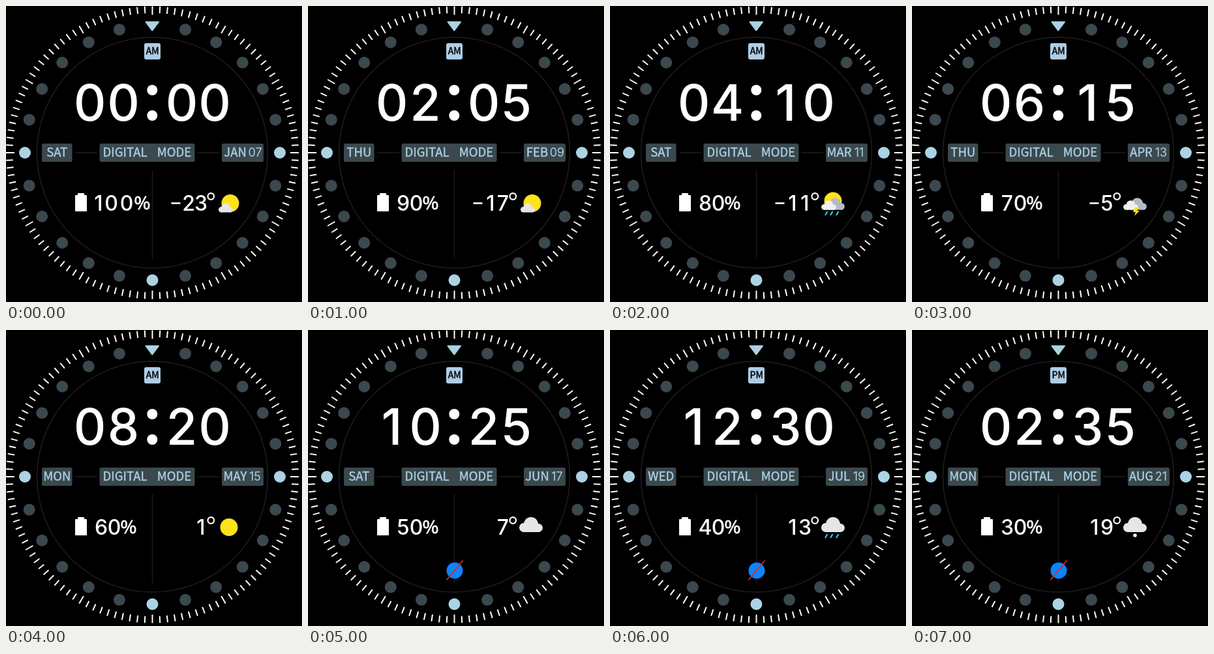
Recreate the animation shown at these times as an HTML page. Size 454 by 454 pixels, loop 8 s.

```html
<!DOCTYPE html>
<html lang="en">
<head>
<meta charset="utf-8">
<title>Digital watch face</title>
<style>
  html, body { margin: 0; width: 100%; height: 100%; overflow: hidden; background: #000; }
  svg { display: block; width: 454px; height: 454px; }
  text { text-anchor: middle; white-space: pre; }
  .label { font: 18.5px "Noto Sans CJK SC", "Noto Sans CJK JP", "Noto Sans CJK", "Noto Sans", sans-serif; fill: #a9cfe2; stroke: #a9cfe2; stroke-width: .45px; }
  .small { font-size: 14px; fill: #000; stroke: #000; }
  .percent { font-size: 26.5px; fill: #fff; stroke: #fff; stroke-width: .9px; }
  .digit { font-family: Inter, sans-serif; font-weight: 500; fill: #fff; }
  .date { font-weight: 400; fill: #a9cfe2; }
</style>
</head>
<body>
<svg id="face" viewBox="0 0 454 454">
  <g id="dial"></g>
  <g id="readout"></g>
</svg>
<script>
const CX = 224.5, CY = 225;
const LIGHT = '#acd3e4', SLATE = '#3b484d', FAINT = '#1e1e1e';
const YELLOW = '#ffe21a', CLOUD = '#e6e6e6', CYAN = '#3fd9ee';

const circle = (x, y, r, fill) => `<circle cx="${x}" cy="${y}" r="${r}" fill="${fill}"/>`;
const rect = (x, y, w, h, fill, r = 0) =>
  `<rect x="${x}" y="${y}" width="${w}" height="${h}" rx="${r}" fill="${fill}"/>`;
const line = (x1, y1, x2, y2, stroke, width) =>
  `<line x1="${x1}" y1="${y1}" x2="${x2}" y2="${y2}" stroke="${stroke}" stroke-width="${width}"/>`;
const label = (s, x, y = 231, kind = '') => `<text class="label ${kind}" x="${x}" y="${y}">${s}</text>`;
const digits = (s, xs, y, size) => [...String(s)].map((c, i) =>
  `<text class="digit" x="${xs[i]}" y="${y}" font-size="${size}">${c}</text>`).join('');
const pad = n => String(n).padStart(2, '0');

// Cloud 36 by 23 units, centred on x, y
const cloud = (x, y, scale = 1, fill = CLOUD) =>
  `<g transform="translate(${x} ${y}) scale(${scale})">` +
  circle(-11, 4.5, 7, fill) + circle(0, -.5, 11, fill) + circle(11.5, 5, 6.5, fill) +
  rect(-11, 2, 22.5, 9.5, fill) + '</g>';
const drops = y => [330, 338, 347].map(x => line(x + 3.5, y, x, y + 6, CYAN, 2)).join('');
const pairOfClouds = () => cloud(345.5, 303.5, .8, '#b4bcc0') + cloud(335.5, 305.5, .63, '#f0f0f0');

const weather = {
  partly: () => circle(344, 302.5, 13.5, YELLOW) + cloud(337, 309.5, .61),
  showers: () => circle(342, 299, 13.5, YELLOW) + pairOfClouds() + drops(315),
  storm: () => pairOfClouds() + `<path d="M342 309h6l-3 5h4l-8 8 2-6h-4z" fill="${YELLOW}"/>`,
  sun: () => circle(342, 302.5, 13.5, YELLOW),
  cloudy: () => cloud(342, 298.5),
  rain: () => cloud(342, 298.5) + drops(313),
  snow: () => cloud(342, 298.5) + circle(342, 315, 2.8, '#f2f2f2')
};

const days = ['SAT', 'THU', 'SAT', 'THU', 'MON', 'SAT', 'WED', 'MON'];
const months = ['JAN', 'FEB', 'MAR', 'APR', 'MAY', 'JUN', 'JUL', 'AUG'];
const dates = [7, 9, 11, 13, 15, 17, 19, 21];
const skies = ['partly', 'partly', 'showers', 'storm', 'sun', 'cloudy', 'rain', 'snow'];

function drawDial() {
  let out = '';
  for (let a = 0; a < 360; a += 3) {
    const major = a % 30 === 0;
    out += `<g transform="rotate(${a} ${CX} ${CY})">` +
      line(CX, CY - 224.5, CX, CY - (major ? 211.5 : 214), '#fff', 2) + '</g>';
  }
  for (let a = 15; a < 360; a += 15) {
    const t = a * Math.PI / 180;
    out += circle(CX + 195.5 * Math.sin(t), CY - 195.5 * Math.cos(t), 9, a % 90 ? SLATE : LIGHT);
  }
  out += `<path d="M214.5 24.5h19.5l-9.75 13z" fill="${LIGHT}" stroke="${LIGHT}" stroke-width="2" stroke-linejoin="round"/>`;
  out += `<circle cx="${CX}" cy="${CY}" r="177" fill="none" stroke="${FAINT}" stroke-width="1.5"/>`;
  out += line(106, 225, 140, 225, FAINT, 1.5) + line(293, 225, 327, 225, FAINT, 1.5);
  out += line(224.5, 252, 224.5, 388, FAINT, 1.2);
  out += rect(55, 211, 46.5, 28, SLATE, 2.5) + rect(143.5, 211, 146, 28, SLATE, 2.5) + rect(331, 211, 64, 28, SLATE, 2.5);
  out += label('DIGITAL', 182.5) + label('MODE', 258);
  out += rect(212, 57, 25, 25, '#aecde4', 3);
  out += circle(224.3, 129, 8, '#fff') + circle(224.3, 168, 8, '#fff');
  out += rect(106, 290, 18, 25, '#fff', 1) + rect(110, 287, 10, 4, '#fff', 1);
  return out;
}

function drawReadout(step) {
  const hour = step * 2, charge = 100 - step * 10, temp = step * 6 - 23;
  const full = charge === 100;
  let out = digits(pad(hour > 12 ? hour - 12 : hour) + pad(step * 5), [128.5, 180, 269.5, 320], 175.5, 77);
  out += label(hour < 12 ? 'AM' : 'PM', 224.7, 74.3, 'small');
  out += label(days[step], 78.3) + label(months[step], 351.5);
  out += `<text class="digit date" x="382" y="231" font-size="18">${pad(dates[step])}</text>`;
  out += digits(charge, full ? [142, 161.5, 185] : [146, 166], 314, 32);
  out += label('%', full ? 209 : 188, 312, 'percent');
  const value = String(Math.abs(temp));
  const cells = value.length > 1 ? [280, 299] : [299];
  out += digits(value, cells, 314, 32);
  if (temp < 0) out += line(cells[0] - 26.5, 302.5, cells[0] - 12.5, 302.5, '#fff', 2.6);
  out += '<circle cx="314.3" cy="292" r="4.8" fill="none" stroke="#fff" stroke-width="2.2"/>';
  out += weather[skies[step]]();
  if (step > 4) out += circle(225, 369, 12.5, '#0a84ff') + line(212.5, 383.5, 237.5, 353.5, '#f0201c', 1.8);
  return out;
}

const readout = document.getElementById('readout');
document.getElementById('dial').innerHTML = drawDial();
const start = performance.now();
let shown = -1;

function tick() {
  const step = Math.floor((performance.now() - start) / 1000) % 8;
  if (step !== shown) readout.innerHTML = drawReadout(shown = step);
  requestAnimationFrame(tick);
}
tick();
</script>
</body>
</html>
```
